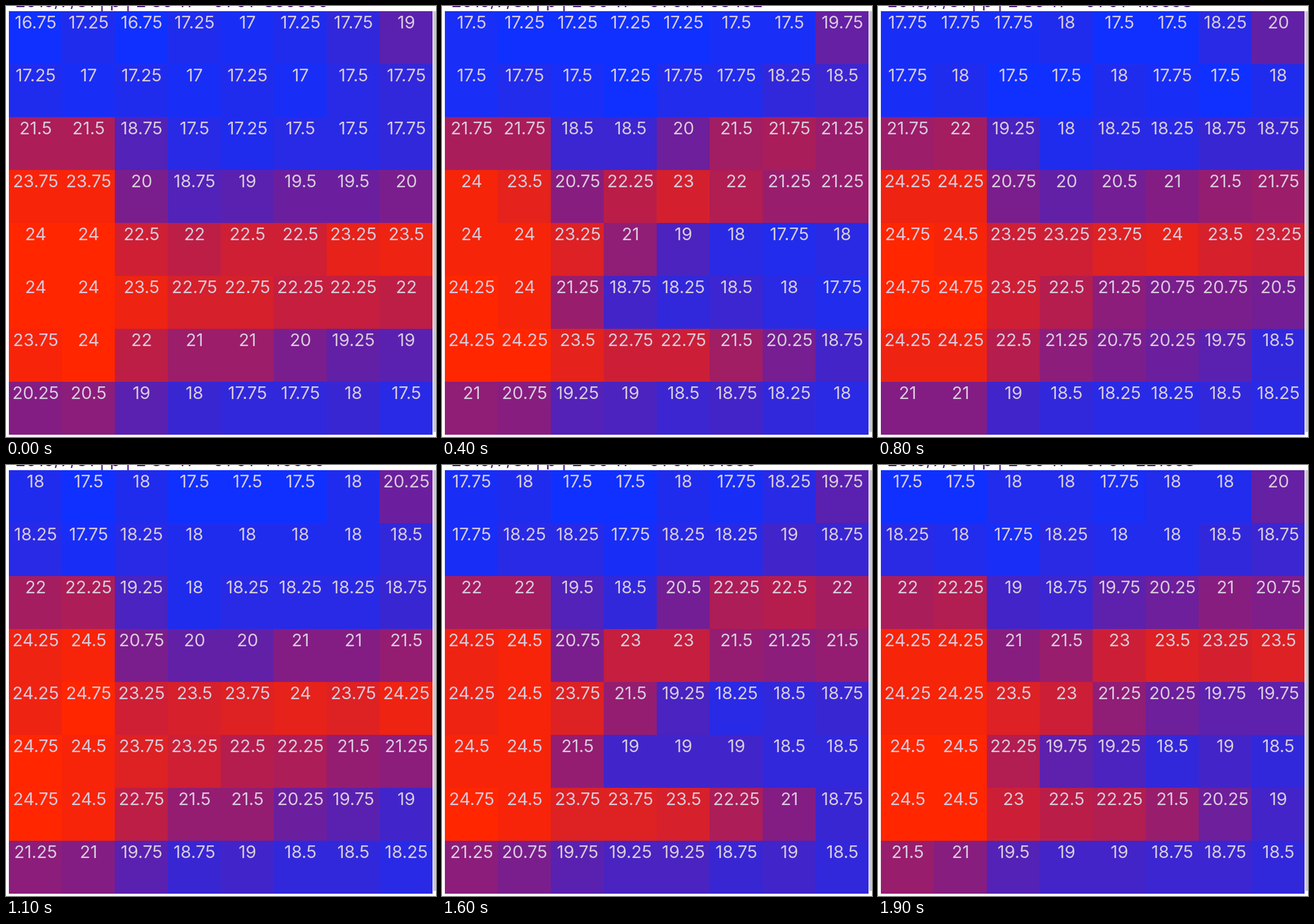
Write an HTML page with a canvas that moves like this. It is 747 px wide and 749 px high and loops after 2000 ms.

```html
<!DOCTYPE html>
<html lang="en">
<head>
<meta charset="utf-8">
<title>Thermal grid</title>
<style>
  html, body { margin: 0; width: 100%; height: 100%; overflow: hidden; background: #fff; }
  canvas { display: block; }
</style>
</head>
<body>
<canvas id="stage" width="747" height="749"></canvas>
<script>
const ctx = document.getElementById('stage').getContext('2d');
const SIZE = 8, CELL = 92, LEFT = 5, TOP = 9, STEP_MS = 100, STEPS = 20;

// [step, lift]: how many rows the arm is raised
const wave = [[0, 0], [2, 1.5], [4, 1.9], [6, 1.35], [8, .5], [11, .3],
              [13, 2.2], [16, 2], [19, 1.5], [20, 0]];

const mix = (a, b, t) => a + (b - a) * t;
const bump = (distance, width, power = 2) => Math.exp(-Math.pow(Math.abs(distance / width), power));

function liftAt(step) {
  const i = wave.findIndex(key => key[0] > step);
  const [s0, lift0] = wave[i - 1], [s1, lift1] = wave[i];
  return mix(lift0, lift1, (step - s0) / (s1 - s0));
}

// Repeatable sensor noise from -1 to 1
function noise(row, col, step) {
  const n = Math.sin(row * 127.1 + col * 311.7 + step * 74.7) * 43758.5;
  return 2 * (n - Math.floor(n)) - 1;
}

function temperature(row, col, step) {
  const lift = liftAt(step);
  const armRow = 4.9 - .1 * col - lift * Math.sin((col - .9) * .33);
  const sources = [
    bump(col - .5, 1.4, 4) * bump(row - 4.3, 2.65, 6),                        // body
    (.92 - .06 * lift) * bump(row - armRow, 1.35 - .2 * lift),                // arm
    (.3 + .25 * lift) * bump(row - 6, .75) * bump(col, 6.3, 6),               // leg
    .34 * bump(row, .7) * bump(col - 7, .7)                                   // warm corner
  ];
  const heat = 1 - sources.reduce((cold, source) => cold * (1 - source), 1);
  const ambient = 17.1 + .07 * row + Math.min(.75, step * .065);
  return Math.round((ambient + 6.5 * heat + .3 * noise(row, col, step)) * 4) / 4;
}

function heatColor(t) {
  const green = mix(48, 38, t) - 56 * t * (1 - t);
  return `rgb(${mix(16, 255, t)}, ${green}, ${mix(255, 0, t)})`;
}

function draw(step) {
  ctx.fillStyle = '#fff';
  ctx.fillRect(0, 0, 747, 749);
  ctx.fillStyle = '#cbcace';
  ctx.fillRect(742, TOP, 5, 731);

  // Timestamp line, cut off by the top edge
  ctx.font = '30px Inter, sans-serif';
  ctx.textAlign = 'left';
  ctx.fillStyle = '#4b167f';
  const fraction = String(300000 + step * 100873).slice(0, 6);
  ctx.fillText(`2019/7/31 | p | 2:30:11  +01:01  ${fraction}`, 16, 2);

  const indexes = [...Array(SIZE).keys()];
  const grid = indexes.map(row => indexes.map(col => temperature(row, col, step)));
  const low = Math.min(...grid.flat()), high = Math.max(...grid.flat());
  ctx.textAlign = 'center';
  grid.forEach((line, row) => line.forEach((value, col) => {
    const x = LEFT + col * CELL, y = TOP + row * CELL;
    ctx.fillStyle = heatColor((value - low) / (high - low));
    ctx.fillRect(x, y, CELL, CELL);
    ctx.fillStyle = '#d8cbdc';
    ctx.fillText(value, x + CELL / 2 + .5, y + 30);
  }));
}

const start = performance.now();
let shown = -1;
function tick() {
  const step = Math.floor((performance.now() - start) / STEP_MS) % STEPS;
  if (step !== shown) draw(shown = step);
  requestAnimationFrame(tick);
}
tick();
</script>
</body>
</html>
```
